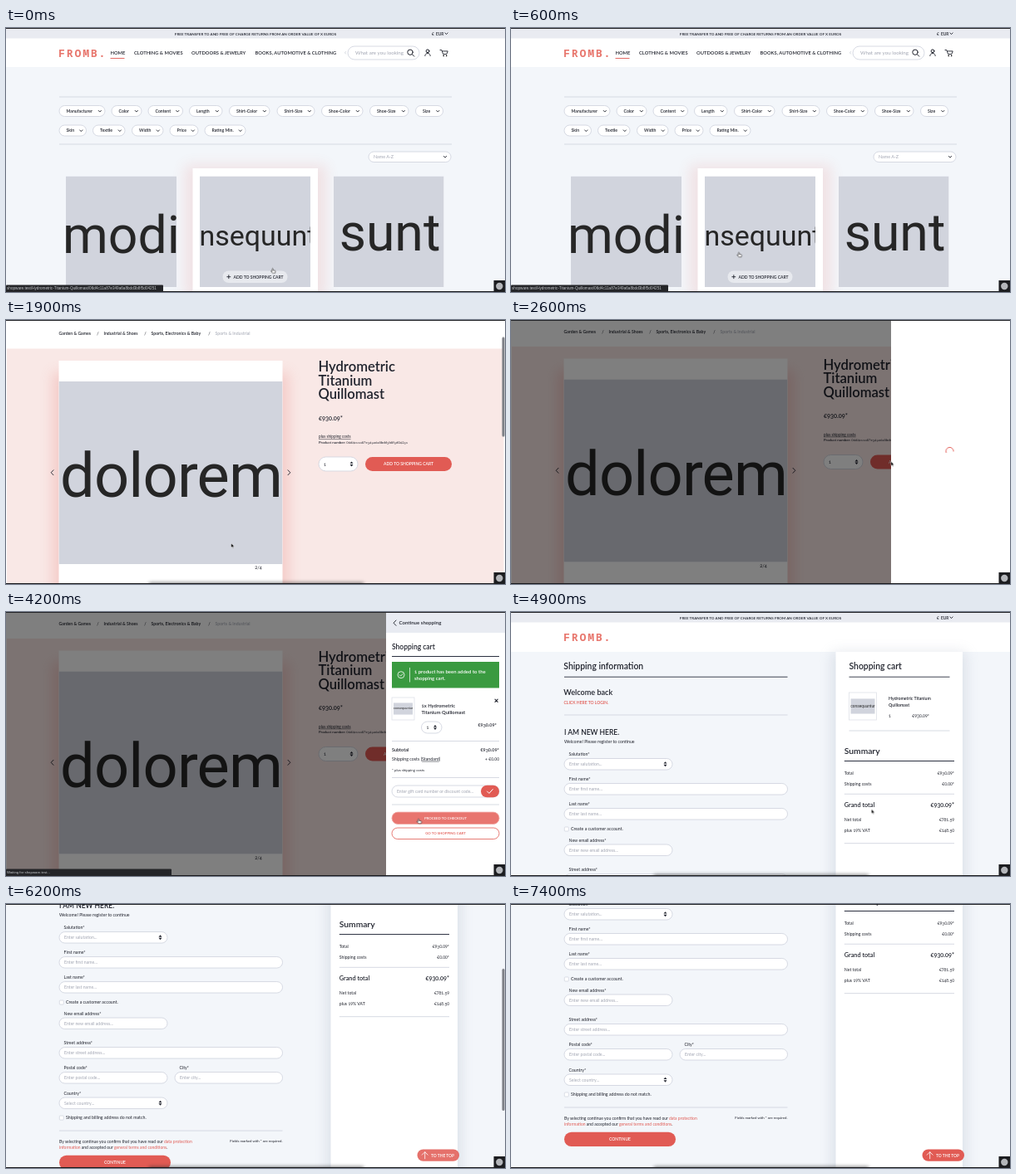
Write an HTML page that moves like this. It is 600x318 px and loops after 7.6 s.

```html
<!DOCTYPE html>
<html lang="en">
<head>
<meta charset="utf-8">
<title>Shop checkout</title>
<style>
html, body { margin: 0; width: 100%; height: 100%; overflow: hidden; background: #fff; }
svg { display: block; width: 100vw; height: 100vh; }
text { font-family: Lato, "Open Sans", sans-serif; font-variant-numeric: oldstyle-nums; fill: #20232d; white-space: pre; }
.b { font-weight: 600; }
.g { fill: #a2a6b3; }
.r { fill: #e15b54; }
.w { fill: #fff; }
.m { text-anchor: middle; }
.e { text-anchor: end; }
.u { text-decoration: underline; }
.pic { font-family: Roboto, sans-serif; fill: #262626; }
.sys { font-family: "Liberation Sans", Arial, sans-serif; fill: #c6c9cd; font-variant-numeric: normal; }
.logo { font-family: "Noto Sans Mono", monospace; font-weight: 600; letter-spacing: 1.8px; fill: #e8776e; }
.line { fill: none; stroke: #20232d; stroke-linecap: round; stroke-linejoin: round; }
.soft { filter: blur(8px); }

.show, .move { animation: 7.6s infinite both; }
.show { animation-timing-function: step-end; }
.move { animation-timing-function: linear; }

#listing { animation-name: listing; }
@keyframes listing { 0% { visibility: visible } 14.4%, 100% { visibility: hidden } }
#product { animation-name: scroll1; }
@keyframes scroll1 {
  0%, 18.3% { transform: none; animation-timing-function: ease-out }
  25% { transform: translateY(-49px) }
  26.3%, 100% { transform: translateY(-51.5px) }
}
#thumb1 { animation-name: thumb1; }
@keyframes thumb1 {
  0%, 18.3% { transform: none; animation-timing-function: ease-out }
  25% { transform: translateY(18.5px) }
  26.3%, 100% { transform: translateY(19.5px) }
}
#bar1 { animation-name: bar1; }
@keyframes bar1 { 0% { visibility: hidden } 18.3% { visibility: visible } 30.2%, 100% { visibility: hidden } }

#shade { animation-name: shade; }
@keyframes shade { 0%, 30.2% { opacity: 0 } 33.2%, 60.4% { opacity: .5 } 60.5%, 100% { opacity: 0 } }
#drawer { animation-name: drawer; }
@keyframes drawer {
  0%, 30.2% { transform: translateX(144px); animation-timing-function: ease-out }
  33.8%, 60.4% { transform: none }
  60.5%, 100% { transform: translateX(144px) }
}
#wait { animation-name: wait; }
@keyframes wait { 0% { visibility: visible } 38.1%, 100% { visibility: hidden } }
#cart { animation-name: cart; }
@keyframes cart { 0% { visibility: hidden } 38.1%, 100% { visibility: visible } }
#spin { animation: spin .76s linear infinite; }
@keyframes spin { from { transform: rotate(-152deg) } to { transform: rotate(208deg) } }
#hot { animation-name: hot; }
@keyframes hot { 0%, 48% { opacity: 0 } 50%, 100% { opacity: 1 } }

#checkout { animation-name: checkout; }
@keyframes checkout { 0% { visibility: hidden } 60.4%, 100% { visibility: visible } }
#form { animation-name: scroll2; }
@keyframes scroll2 {
  0%, 65.8% { transform: translateY(52px); animation-timing-function: ease-in }
  72.3% { transform: none; animation-timing-function: cubic-bezier(.25,.4,.5,1) }
  90.7%, 100% { transform: translateY(-119px) }
}
#thumb2 { animation-name: thumb2; }
@keyframes thumb2 {
  0%, 65.8% { transform: none; animation-timing-function: ease-in }
  72.3% { transform: translateY(28px); animation-timing-function: cubic-bezier(.25,.4,.5,1) }
  90.7%, 100% { transform: translateY(92px) }
}
#bar2 { animation-name: bar2; }
@keyframes bar2 { 0% { visibility: hidden } 65.8% { visibility: visible } 90.7%, 100% { visibility: hidden } }
#top { animation-name: top; }
@keyframes top { 0%, 79% { opacity: 0 } 82%, 100% { opacity: 1 } }

#url { animation-name: url; }
@keyframes url { 0% { visibility: visible } 9.2%, 100% { visibility: hidden } }
#busy { animation-name: busy; }
@keyframes busy {
  0% { visibility: hidden } 9.2% { visibility: visible } 18.3% { visibility: hidden }
  50% { visibility: visible } 60.4%, 100% { visibility: hidden }
}
#badge { animation-name: badge; }
@keyframes badge { 0% { visibility: visible } 14.4% { visibility: hidden } 18.3%, 100% { visibility: visible } }
#dock { animation-name: dock; }
@keyframes dock {
  0% { visibility: hidden } 14.4% { visibility: visible }
  30.2% { visibility: hidden } 60.4%, 100% { visibility: visible }
}
#cursor { animation-name: cursor; animation-timing-function: ease-in-out; }
@keyframes cursor {
  0%, 1.3% { transform: translate(320px, 289.5px) }
  9.2%, 25% { transform: translate(270.7px, 269px) }
  30.2%, 38.5% { transform: translate(457px, 170.5px) }
  48.7%, 60.5% { transform: translate(495.5px, 249px) }
  69%, 100% { transform: translate(356.7px, 223.5px) }
}
#hand { animation-name: hand; }
@keyframes hand {
  0% { visibility: visible } 14.4% { visibility: hidden }
  48% { visibility: visible } 60.4%, 100% { visibility: hidden }
}
#arrow { animation-name: arrow; }
@keyframes arrow {
  0% { visibility: hidden } 14.4% { visibility: visible } 48% { visibility: hidden }
  60.4% { visibility: visible } 81.5%, 100% { visibility: hidden }
}
</style>
</head>
<body>
<svg id="stage" viewBox="0 0 600 318" preserveAspectRatio="none"></svg>
<script>
const RED = '#e15b54', GREY = '#d1d4dd', EDGE = '#cdd1dc', INK = '#2b3040', PALE = '#f3f6fa';
const ITEM = ['Hydrometric', 'Titanium', 'Quillomast'];
const ID = '06d4c11a87e349a6a8bdd3b8f5d04251';

const text = (x, y, size, str, cls = '') => `<text x="${x}" y="${y}" font-size="${size}" class="${cls}">${str}</text>`;
const rect = (x, y, w, h, fill, more = '') => `<rect x="${x}" y="${y}" width="${w}" height="${h}" fill="${fill}" ${more}/>`;
const pill = (x, y, w, h, fill = '#fff', edge = EDGE) => rect(x, y, w, h, fill, `rx="${h / 2}" stroke="${edge}" stroke-width=".8"`);
const rule = (x, y, x2, color = EDGE, w = .8) => rect(x, y - w / 2, x2 - x, w, color);
const path = (d, w = .9, color = '#20232d') => `<path d="${d}" class="line" style="stroke:${color}" stroke-width="${w}"/>`;
const down = (x, y) => path(`M${x - 1.6} ${y - .8}l1.6 1.7 1.6-1.7`);
const updown = (x, y) => `<path d="M${x - 2} ${y - .6}l2-2.4 2 2.4zM${x - 2} ${y + .6}l2 2.4 2-2.4z" fill="#20232d"/>`;
const clip = (x, y, w, h, body) => `<svg x="${x}" y="${y}" width="${w}" height="${h}" viewBox="${x} ${y} ${w} ${h}">${rect(x, y, w, h, GREY)}${body}</svg>`;
const group = (id, cls, body) => `<g id="${id}" class="${cls}">${body}</g>`;
const logo = text(63, 34.6, 13.2, 'FROMB.', 'logo');

const banner = rect(0, 0, 600, 47, '#fff') + rect(0, 0, 600, 12.5, '#e9ebf1') +
  text(300, 8.5, 4.55, 'FREE TRANSFER TO AND FREE OF CHARGE RETURNS FROM AN ORDER VALUE OF X EUROS', 'm b') +
  text(512, 8.5, 4.8, '€&#160; EUR', 'b') + down(529.5, 6.7) + logo;

const header = banner +
  [[125.5, 'HOME'], [154, 'CLOTHING &amp; MOVIES'], [223, 'OUTDOORS &amp; JEWELRY'], [299.5, 'BOOKS, AUTOMOTIVE &amp; CLOTHING']]
    .map(([x, s]) => text(x, 31.8, 5.8, s, 'b')).join('') +
  path('M408.5 28.5l-1 1.3 1 1.3', .6, '#b8bcc8') +
  pill(411, 22, 86, 16) + text(420, 32, 6.2, 'What are you looking', 'g') +
  '<circle cx="486" cy="29.2" r="3.2" class="line"/>' + path('M488.4 31.8l2.4 2.4', 1) +
  '<circle cx="507" cy="27.8" r="1.9" class="line"/>' + path('M503.8 33.6c.3-4.4 6.1-4.4 6.4 0') +
  path('M522 26.5h1.8l1.8 5h4.2l1.4-3.6h-6.6') +
  '<circle cx="526.2" cy="33.4" r=".8"/><circle cx="529.6" cy="33.4" r=".8"/>';

// Product list
const filters = (y, list) => list.map(([x, x2, s]) =>
  pill(x, y, x2 - x, 13) + text(x + 8.5, y + 8.4, 5.2, s, 'b') + down(x2 - 6.2, y + 6.7)).join('');

const listing = rect(0, 0, 600, 318, PALE) + header + rule(125.5, 36.5, 142.5, RED, .9) +
  rule(64, 83, 536) + rule(64, 140, 536) +
  filters(93.5, [[64, 119, 'Manufacturer'], [127, 163, 'Color'], [171, 212.5, 'Content'], [220.5, 260, 'Length'],
    [268.5, 317, 'Shirt-Color'], [326, 371, 'Shirt-Size'], [379.5, 429, 'Shoe-Color'], [437.5, 484, 'Shoe-Size'], [492.5, 525.5, 'Size']]) +
  filters(117, [[64, 96.5, 'Skin'], [104.5, 143, 'Textile'], [151.5, 189, 'Width'], [197, 231, 'Price'], [239, 288, 'Rating Min.']]) +
  pill(436, 149, 99, 12.5) + text(442, 157.2, 5.4, 'Name A-Z', 'g') + down(528, 155.2) +
  rect(215, 165, 170, 160, RED, 'class="soft" opacity=".13"') + rect(224.5, 169, 150.5, 150, '#fff') +
  clip(72, 178.5, 133, 133.5, text(138.5, 271, 62.5, 'modi', 'pic m')) +
  clip(233, 178.5, 133, 133.5, text(299.5, 261.5, 34, 'consequuntur', 'pic m')) +
  clip(394, 178.5, 132.5, 133.5, text(461.5, 268, 62.5, 'sunt', 'pic m')) +
  rect(260.5, 292.5, 78, 14.5, '#e7e9ee', 'rx="7.25"') + path('M265.8 299.7h4M267.8 297.7v4') +
  text(303.5, 301.6, 5, 'ADD TO SHOPPING CART', 'm b');

// Product page
const product = rect(0, 0, 600, 480, '#fff') + header +
  [[63.5, 'Garden &amp; Games'], [117.5, 'Industrial &amp; Shoes'], [174.5, 'Sports, Electronics &amp; Baby']]
    .map(([x, s]) => text(x, 67, 5.15, s, 'b')).join('') +
  [110.5, 167.5, 244.5].map(x => text(x, 67, 5.2, '/', 'm')).join('') +
  `<g style="opacity:.85">${text(251.5, 67, 5.15, 'Sports &amp; Industrial', 'g b')}</g>` +
  rect(1, 83.5, 597.5, 390, '#f9e8e6') +
  rect(56, 112, 284, 360, RED, 'class="soft" opacity=".2"') +
  rect(63.5, 98, 269, 380, '#fff') +
  clip(63.5, 123, 269, 220, `<g style="letter-spacing:-.8px">${text(198.5, 262, 74, 'dolorem', 'pic m')}</g>`) +
  text(303.5, 349.3, 5.6, '2/4', 'm') +
  path('M57 229.8l-2.8 3 2.8 3') + path('M339 229.8l2.8 3-2.8 3') +
  ITEM.map((s, i) => text(375.5, 111.5 + 16.4 * i, 16.6, s, 'b')).join('') +
  text(376, 169.6, 7.4, '€930.09*', 'b') +
  text(376, 191.2, 4.7, 'plus shipping costs', 'u') +
  text(376, 197.8, 4.35, `<tspan class="b">Product number:</tspan> ${ID}`) +
  pill(376, 214, 47, 17) + text(382, 224.6, 5.4, '1') + updown(415.5, 222.5) +
  rect(432, 214, 104, 17, RED, 'rx="8.5"') + text(484, 224.4, 5, 'ADD TO SHOPPING CART', 'm w b');

// Cart drawer
const thumb = (x, y, w, h, size) => rect(x, y, w, w, '#fff', 'stroke="#dfe1e8" stroke-width=".8"') +
  clip(x + 1.8, y + (w - h) / 2, w - 3.6, h, text(x + w / 2, y + w / 2 + size * .25, size, 'consequuntur', 'pic m'));

const cart = rect(457, 0, 143, 25, '#e8ebf2') + path('M469 10l-3 3.2 3 3.2') +
  text(472.5, 15.2, 6.1, 'Continue shopping', 'b') +
  text(464, 45, 8.5, 'Shopping cart', 'b') + rule(464, 53.5, 593, INK, 1) +
  rect(464, 60, 129, 31.5, '#3a9a40') +
  '<circle cx="475" cy="75.7" r="4" fill="none" stroke="#fff" stroke-width=".8"/>' + path('M473.2 75.8l1.4 1.4 2.4-2.7', .8, '#fff') +
  rect(485, 67, .7, 17.5, '#fff') +
  text(491, 73.5, 6, '1 product has been added to the', 'w b') + text(491, 82, 6, 'shopping cart.', 'w b') +
  thumb(464, 103, 27, 14.5, 3.8) +
  text(499.5, 115, 5.9, '1x ' + ITEM[0], 'b') + text(499.5, 123.4, 5.9, ITEM[1] + ' ' + ITEM[2], 'b') +
  path('M588 105.2l3.2 3.2m0-3.2l-3.2 3.2', 1.1) +
  pill(499.5, 132, 24.5, 14) + text(505.5, 141, 5.4, '1') + updown(516, 139) +
  text(590, 137.6, 5.8, '€930.09*', 'e b') + rule(464, 155.5, 593) +
  text(464, 167.5, 5.5, 'Subtotal', 'b') + text(593, 167.7, 5.8, '€930.09*', 'e b') +
  text(464, 178.8, 5.3, 'Shipping costs (<tspan class="u">Standard</tspan>)') + text(593, 178.8, 5.3, '+ €0.00', 'e') +
  text(464, 191.6, 4.4, '* plus shipping costs') + rule(464, 199.5, 593) +
  pill(464, 209, 129, 14) + text(470, 217.8, 5.1, 'Enter gift card number or discount code...', 'g') +
  rect(571, 208.7, 22, 14.6, RED, 'rx="7.3"') + path('M578.5 216l2.4 2.4 4.4-4.8', 1, '#fff') +
  rule(464, 232, 593) +
  rect(464, 241, 129, 14.5, RED, 'rx="7.25"') +
  group('hot', 'move', pill(464, 241, 129, 14.5, '#e8756f', '#f3b4b0')) +
  text(528.5, 249.9, 4.3, 'PROCEED TO CHECKOUT', 'm w b') +
  pill(464, 260, 129, 13.5, '#fff', RED) + text(528.5, 268.4, 4.3, 'GO TO SHOPPING CART', 'm r b');

const drawer = rect(457, 0, 143, 318, '#fff') +
  group('wait', 'show', `<g transform="translate(527.5 158)"><g id="spin">${path('M-4.3 1.6A4.6 4.6 0 1 1 4.6 0', 1, RED)}</g></g>`) +
  group('cart', 'show', cart);

// Checkout page
const field = (x, y, w, label, hint, pick) => text(x + 5.5, y - 3.5, 5.2, label + '*') + pill(x, y, w, 13.5) +
  text(x + 6, y + 8.7, 5.2, hint + '...', 'g') + (pick ? updown(x + w - 8.5, y + 6.7) : '');
const check = (y, s) => rect(64.3, y, 5, 5, '#fff', `rx=".8" stroke="${EDGE}" stroke-width=".7"`) + text(72, y + 4.4, 5.25, s);
const sum = (y, name, price, size = 5.2, cls = '') => text(400.8, y, size, name, cls) + text(533, y, size, price, 'e ' + cls);

const form = rect(0, -52, 600, 48, '#fff') + `<g transform="translate(0 -52)">${banner}</g>` +
  text(63.3, 16.6, 10.4, 'Shipping information', 'b') + rule(64, 26.2, 332.5, INK, .9) +
  text(63.3, 47.7, 9.1, 'Welcome back', 'b') + text(63.5, 58.7, 5, 'CLICK HERE TO LOGIN.', 'r b') + rule(64, 72, 332.5) +
  text(64, 96.4, 8.5, 'I AM NEW HERE.', 'b') + text(64, 106, 5.2, 'Welcome! Please register to continue') +
  field(64, 124.5, 130, 'Salutation', 'Enter salutation', true) +
  field(64, 154.5, 268.5, 'First name', 'Enter first name') +
  field(64, 184.5, 268.5, 'Last name', 'Enter last name') +
  check(207, 'Create a customer account.') +
  field(64, 228, 130, 'New email address', 'Enter new email address') +
  field(64, 263.5, 268.5, 'Street address', 'Enter street address') +
  field(64, 293.5, 130, 'Postal code', 'Enter postal code') +
  field(203, 293.5, 129.5, 'City', 'Enter city') +
  field(64, 324, 130, 'Country', 'Select country', true) +
  check(346, 'Shipping and billing address do not match.') + rule(64, 364, 332.5) +
  text(64, 378.7, 5, 'By selecting continue you confirm that you have read our <tspan class="r">data protection</tspan>') +
  text(64, 386.2, 5, '<tspan class="r">information</tspan> and accepted our <tspan class="r">general terms and conditions</tspan>.') +
  text(332.5, 378.4, 4.3, 'Fields marked with * are required.', 'e') +
  rect(64, 393.7, 134, 17.3, RED, 'rx="8.6"') + text(131, 404.2, 5, 'CONTINUE', 'm w b') +
  rect(386, -4, 161, 520, '#8c98b0', 'class="soft" opacity=".22"') + rect(390.5, -4, 152.5, 520, '#fff') +
  text(406.5, 16.6, 10.4, 'Shopping cart', 'b') + rule(406.5, 26.2, 527.5, INK, .9) +
  thumb(406.5, 45, 33, 18.5, 4.8) +
  text(454, 54, 5.25, ITEM[0] + ' ' + ITEM[1], 'b') + text(454, 61.8, 5.25, ITEM[2], 'b') +
  text(454, 74.7, 5.2, '1') + text(503, 74.7, 5.3, '€930.09*', 'e') + rule(406.5, 91, 527.5) +
  text(400.8, 118.5, 10.3, 'Summary', 'b') + rule(400.8, 127.5, 533, INK, 1) +
  sum(144, 'Total', '€930.09*') + sum(157.3, 'Shipping costs', '€0.00*') + rule(400.8, 167.2, 533) +
  sum(182.8, 'Grand total', '€930.09*', 7.3, 'b') +
  sum(200.2, 'Net total', '€781.59') + sum(213.4, 'plus 19% VAT', '€148.50') + rule(400.8, 226.7, 533);

const checkout = rect(0, 0, 600, 318, PALE) + group('form', 'move', form) +
  group('top', 'move', rect(494.5, 295.5, 50.5, 14.3, RED, 'rx="7.1"') +
    path('M503.7 306.8v-8M500.2 302.2l3.5-3.5 3.5 3.5', .8, '#fff') + text(511, 304.5, 4.9, 'TO THE TOP', 'w b')) +
  group('bar2', 'show', `<g id="thumb2" class="move">${rect(596.5, 1, 3, 171, '#7d7f85', 'rx="1.5"')}</g>`);

// Browser chrome and pointer
const status = (id, w, size, s) => group(id, 'show', rect(0, 309.5, w, 9, '#242528', 'rx="1"') + text(1, 315.2, size, s, 'sys'));

document.getElementById('stage').innerHTML =
  group('product', 'move', product) +
  group('bar1', 'show', `<g id="thumb1" class="move">${rect(596.5, 2, 3, 120, '#7d7f85', 'rx="1.5"')}</g>`) +
  group('listing', 'show', listing) +
  group('shade', 'move', rect(0, 0, 600, 318, '#000')) +
  group('drawer', 'move', drawer) +
  group('checkout', 'show', checkout) +
  group('dock', 'show', rect(172, 316, 258, 6, '#333', 'opacity=".55" style="filter:blur(2px)"')) +
  rect(0, 0, 600, 1, '#222327') + rect(0, 317, 600, 1, '#17181b') +
  status('url', 189, 4.65, `shopware.test/${ITEM.join('-')}/${ID}`) +
  status('busy', 199, 4.3, 'Waiting for shopware.test...') +
  group('badge', 'show', rect(586.5, 304, 13.5, 14, '#1c1d20') + '<circle cx="593.3" cy="311" r="4.2" fill="#b4b6ba"/>') +
  group('cursor', 'move',
    group('arrow', 'show', '<path d="M0 0v5l1.2-1 .8 1.8.9-.4-.8-1.7h1.6z" fill="#000" stroke="#fff" stroke-width=".4"/>') +
    group('hand', 'show', '<path d="M0 .6q.6-.9 1.2 0v1.7l2.4.6q.6.2.5 1l-.5 1.9h-3L-1.4 3.6q0-.9.9-.5L0 3.6z" fill="#fff" stroke="#222" stroke-width=".6"/>'));
</script>
</body>
</html>
```
